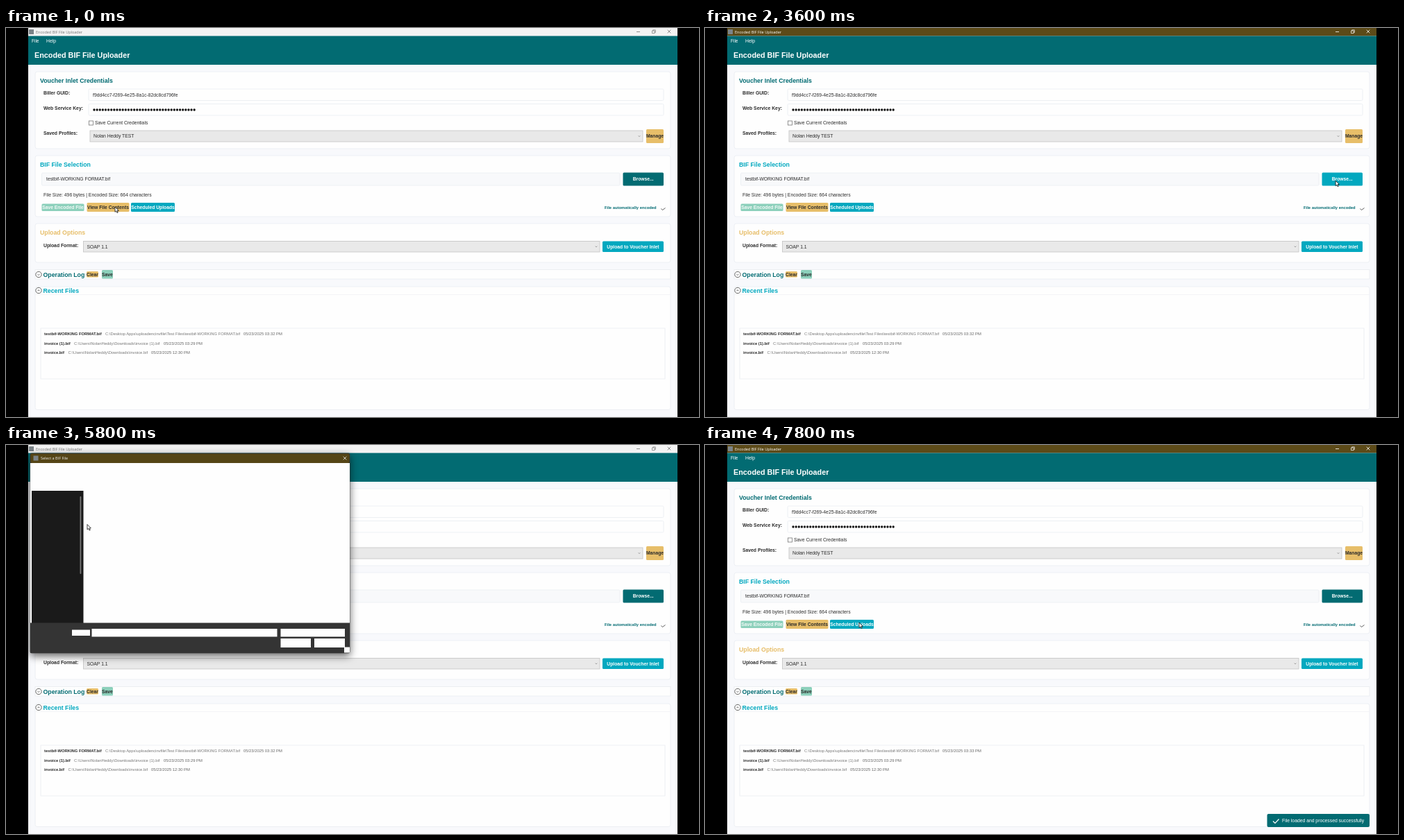
Write an HTML page that moves like this. It is 998x561 px and loops after 8 s.

```html
<!DOCTYPE html>
<html lang="en">
<head>
<meta charset="utf-8">
<title>Encoded BIF File Uploader</title>
<style>
html, body { margin: 0; width: 100%; height: 100%; overflow: hidden; background: #000; }
svg { display: block; width: 100vw; height: 100vh; font-family: "Liberation Sans", Arial, sans-serif; }
.ui { font-family: "Open Sans", "Noto Sans", sans-serif; }
#dialog, #viewer { filter: drop-shadow(0 4px 6px #0009); }
</style>
</head>
<body>
<svg id="stage" viewBox="0 0 998 561"></svg>
<script>
const TEAL = '#026b72', CYAN = '#02a8bf', GOLD = '#e7be69', MINT = '#8cd0bb', BAR = '#5c4a18',
      INK = '#2b2b2b', EDGE = '#e9ecf1', GREY = '#777', PALE = '#ddd';

const box = (x, y, x2, y2, fill, stroke = 'none', r = 0, extra = '') =>
  `<rect x="${x}" y="${y}" width="${x2 - x}" height="${y2 - y}" rx="${r}" fill="${fill}" stroke="${stroke}" stroke-width=".8" ${extra}/>`;
// Text is centred vertically on y.
const text = (x, y, str, size = 6.8, fill = INK, extra = '') =>
  `<text x="${x}" y="${(y + size * .35).toFixed(2)}" font-size="${size}" fill="${fill}" ${extra}>${str}</text>`;
const bold = (x, y, str, size, fill, extra = '') => text(x, y, str, size, fill, 'font-weight="700" ' + extra);
const line = (d, stroke, w = .8) => `<path d="${d}" fill="none" stroke="${stroke}" stroke-width="${w}"/>`;
const dot = (x, y, r, fill, stroke = 'none') =>
  `<circle cx="${x}" cy="${y}" r="${r}" fill="${fill}" stroke="${stroke}" stroke-width=".8"/>`;
const group = (id, body, extra = '') => `<g id="${id}" ${extra}>${body}</g>`;
const cross = (x, y, c) => line(`M${x - 2.3} ${y - 2.3}l4.6 4.6m0-4.6l-4.6 4.6`, c);
const down = (x, y, c, s = 1.5) => line(`M${x - s} ${y - s / 2}l${s} ${s}l${s} ${-s}`, c, .7);
const right = (x, y, c) => line(`M${x - .9} ${y - 1.8}l1.8 1.8l-1.8 1.8`, c, .7);
const button = (x, y, x2, y2, fill, label, ink, id = '') =>
  box(x, y, x2, y2, fill, 'none', 1.5, id && `id="${id}"`) +
  bold((x + x2) / 2, (y + y2) / 2, label, 6.75, ink, 'text-anchor="middle"');
const card = (y, y2) => box(42, y, 957, y2, '#fefefe', EDGE, 3);
const field = (x, y, x2, y2, fill = '#fefefe') => box(x, y, x2, y2, fill, EDGE, 1.5);
const combo = (x, y, x2, y2, label) =>
  box(x, y, x2, y2, '#e9e9e9', '#c3c3c3') + text(x + 5, (y + y2) / 2, label) + down(x2 - 5, (y + y2) / 2, '#666', 1.2);

const titleBar = (id, fill, ink) => group(id,
  box(32, 0, 967, 11.5, fill) + box(33, 2, 40, 9, '#7b8388') +
  text(43, 5.6, 'Encoded BIF File Uploader', 5.5, ink, 'class="ui"') +
  line('M908 5.5h5', ink) + line('M930.5 4h3.6v3.6h-3.6zm1.2 0v-1.2h3.6v3.6h-1.2', ink, .7) + cross(955, 5, ink));

const recent = [
  [441, 'testbif-WORKING FORMAT.bif', 143, 'C:\\Desktop Apps\\uploadencinvfile\\Test Files\\testbif-WORKING FORMAT.bif', 342, '05/23/2025 03:32 PM'],
  [454.5, 'invoice (1).bif', 98, 'C:\\Users\\NolanHeddy\\Downloads\\invoice (1).bif', 227, '05/23/2025 03:29 PM'],
  [468, 'invoice.bif', 89.5, 'C:\\Users\\NolanHeddy\\Downloads\\invoice.bif', 209, '05/23/2025 12:30 PM']
];

const page = () => box(32, 0, 967, 561, '#f8f9fc') + titleBar('idle', '#f3f3f3', '#777') + titleBar('active', BAR, '#fff') +
  box(32, 11.5, 967, 53, TEAL) + text(37, 19, 'File', 6.5, '#fff') + text(58, 19, 'Help', 6.8, '#fff') +
  bold(41, 39.5, 'Encoded BIF File Uploader', 10.8, '#fff') +
  // credentials
  card(63, 174) + bold(49, 75.5, 'Voucher Inlet Credentials', 8.75, TEAL) +
  bold(54, 94, 'Biller GUID:') + field(119, 88, 947, 104.5) + text(125, 96.5, 'f9dd4cc7-f269-4e25-8a1c-82dc8cd796fe') +
  bold(54, 115.5, 'Web Service Key:') + field(119, 109.5, 947, 126) +
  Array.from({length: 36}, (_, i) => dot(127 + i * 4.12, 118, 1.65, '#111')).join('') +
  box(119.5, 134, 125.5, 140, '#fff', '#777') + text(128, 137, 'Save Current Credentials') +
  bold(54, 152, 'Saved Profiles:') + combo(121, 148, 917, 164, 'Nolan Heddy TEST') +
  button(922, 146, 947, 166, GOLD, 'Manage', INK) +
  // file selection
  card(184, 272) + bold(49, 196.5, 'BIF File Selection', 8.75, CYAN) +
  field(51.5, 209, 884, 227, '#f8f9fb') + text(58, 218, 'testbif-WORKING FORMAT.bif') +
  button(888.5, 208.5, 947, 227.5, TEAL, 'Browse...', '#fff', 'browse') +
  text(54, 241, 'File Size: 496 bytes | Encoded Size: 664 characters') +
  button(51.5, 253.5, 112.5, 264, MINT, 'Save Encoded File', '#f4faf8') +
  button(116.5, 252, 177.5, 265, GOLD, 'View File Contents', INK) +
  button(180, 252, 243, 265, CYAN, 'Scheduled Uploads', '#fff') +
  bold(862, 258.5, 'File automatically encoded', 5.85, TEAL) + line('M943.5 260.5l2 2l4-3', '#333') +
  // upload options
  card(282, 338) + bold(49, 295, 'Upload Options', 8.75, GOLD) + bold(54, 314, 'Upload Format:') +
  combo(111.5, 307.5, 855, 323, 'SOAP 1.1') + button(859, 307.5, 947, 323, CYAN, 'Upload to Voucher Inlet', '#fff') +
  // log and recent files
  box(42, 348.5, 957, 362, '#fefefe', EDGE) + dot(47, 355.5, 4.2, '#fff', '#444') + down(47, 355.8, '#333') +
  bold(53.5, 355.5, 'Operation Log', 8.75, TEAL) +
  button(116, 351, 133, 359.5, GOLD, 'Clear', INK) + button(138, 349, 154, 361.5, MINT, 'Save', INK) +
  card(373, 550.5) + line('M42 384.5h915', '#f0f2f5') + dot(47, 378.5, 4.2, '#fff', '#444') + line('M45.5 379.2l1.5-1.5l1.5 1.5', '#333') +
  bold(53.5, 378.5, 'Recent Files', 8.75, CYAN) + box(50, 433, 949, 506, '#fefefe', EDGE) +
  recent.map(([y, name, x, path, dx, date], i) => bold(55, y, name, 5.85) + text(x, y, path, 5.85, GREY) +
    text(dx, y, date, 5.85, '#666', `id="date${i}"`)).join('') +
  group('toast', box(809.5, 532, 957, 551, TEAL, 'none', 2) + line('M818 542.5l3 3l5.5-6', '#fff', 1.2) +
    text(831, 541.5, 'File loaded and processed successfully', 6.8, '#fff'));

const viewer = () => group('viewer', box(103, 118, 895, 440, '#fefefe', '#bbb') + box(103, 118, 895, 130, BAR) + cross(887, 124, '#fff'));

const files = [
  ['invoice (2).bif', '5/23/2025 2:25 PM'], ['invoice.bif', '5/23/2025 11:10 AM'],
  ['invoice_encoded (4).bif', '5/23/2025 9:50 AM'], ['invoice_encoded (3).bif', '5/16/2025 1:04 PM'],
  ['testbif-WORKING FORMAT.bif', '5/23/2025 3:32 PM']
];
const places = ['Documents', 'Pictures', 'Music', 'Videos', 'uploadencinvfile', 'Addinvoicefile', 'images', 'Test Files'];
const placeInk = ['#7d96a8', '#3b9ade', '#e4606d', '#9a5be0'];
const crumbs = [[124, 'This PC'], [154, 'Local Disk (C:)'], [200, 'Desktop Apps'], [248, 'uploadencinvfile'], [300, 'Test Files']];
const rowY = i => 88.5 + i * 14;
const t = (x, y, str, fill = PALE, extra = '') => text(x, y, str, 5.6, fill, extra);
const folder = (x, y) => box(x, y - 2.5, x + 7, y + 2.7, '#f3c64e', 'none', .6) + box(x, y - 3.2, x + 3, y - 1, '#d99d2b');
const pin = (x, y) => line(`M${x - 2} ${y + 2}l2-2m-1-1.5l2.6 2.6m-1.5-3.6l2 2`, '#bbb', .8);

const shell = () => group('shell', box(35, 26, 495, 257, '#fefefe') + box(37, 66, 111.5, 257, '#1a1a1a') +
  box(106.5, 74, 108.3, 186, '#777', 'none', 1) + box(35, 256.5, 495, 300, '#343434') +
  [[95, 266.5, 121, 275], [123.5, 265, 390.5, 276.5], [395.5, 265, 488, 276.5], [395.5, 279, 439, 292],
   [444, 279, 488, 292], [487, 291.5, 495, 299.5]].map(r => box(...r, '#fefefe')).join(''));

const content = () => group('content',
  line('M48.5 38h-6m2.4-2.4l-2.4 2.4l2.4 2.4', PALE) + line('M59.5 38h6m-2.4-2.4l2.4 2.4l-2.4 2.4', GREY) +
  down(77.5, 38, '#999') + line('M92.5 41v-6m-2.4 2.4l2.4-2.4l2.4 2.4', PALE) +
  box(103, 30, 372, 46, '#1f1f1f', '#2c2c2c') + box(392, 30, 489, 46, '#1f1f1f', '#2c2c2c') + folder(106.5, 38) +
  crumbs.map(([x, s]) => right(x - 5.5, 38, '#ccc') + t(x, 38, s)).join('') + down(364, 38, PALE, 2) +
  line('M383 36.2a2.8 2.8 0 1 0 .5 2.4m0-4v2h-2', PALE) + t(397, 38, 'Search Test Files', '#777') +
  line('M480 40.5l2-2m0-.2a1.8 1.8 0 1 0 2.6-2.4a1.8 1.8 0 0 0-2.6 2.4', '#bbb') +
  line('M35 51h460', '#2c2c2c') + t(44, 58, 'Organize') + down(71, 58, '#999', 1) + t(87, 58, 'New folder') +
  box(438, 54.5, 446, 61, '#aaa', '#ccc') + down(452, 58, '#bbb', 1) + box(463, 54.5, 471, 61, '#eee') + box(467, 55, 471, 60.5, '#3a9bdc') +
  dot(485, 57.5, 3.8, '#1683d8') + t(485, 57.5, '?', '#fff', 'text-anchor="middle"') +
  places.map((s, i) => {
    const y = 73.5 + i * 15.65;
    return (i < 4 ? box(52, y - 3, 58.5, y + 3, placeInk[i], 'none', 1) + pin(99, y) : folder(52, y)) + t(61, y, s);
  }).join('') +
  line('M41 198h58', '#3a3a3a') + box(37, 222.5, 103, 237, '#363636') +
  down(43.5, 214, PALE, 2) + box(52, 211, 59, 216, '#36a6df', 'none', .5) + t(61, 214, 'This PC') +
  right(47.5, 229.5, PALE) + box(56, 227.5, 63, 231.5, '#9fb8c8') + t(64.5, 229.5, 'Local Disk (C:)') +
  right(43.5, 245, PALE) + box(52, 242, 59, 247.5, '#4aa8cf') + t(61, 245, 'Network') +
  box(106.3, 104, 108.3, 238, '#8a8a8a', 'none', 1) + line('M112 66v190', '#2c2c2c') +
  line('M262 66v14M341 66v14M407 66v14M451 66v14', '#444', .7) + line('M192 68l1.5-1.2l1.5 1.2', '#888', .6) +
  t(127.5, 73, 'Name') + t(265, 73, 'Date modified') + t(344.5, 73, 'Type') + t(410, 73, 'Size') +
  box(120, 0, 449, 13, '#4d4d4d', 'none', 0, 'id="hover"') +
  files.map(([name, date], i) => {
    const y = rowY(i);
    return box(123, y - 3.6, 128.5, y + 3.6, '#e8e8e8') + line(`M124.2 ${y - 1}h3m-3 1.7h3`, '#888', .5) +
      t(131, y, name) + t(265, y, date, '#bbb') + t(344.5, y, 'BIF File', '#bbb') + t(448, y, '1 KB', '#bbb', 'text-anchor="end"');
  }).join('') +
  box(35, 256.5, 495, 300, '#2b2b2b') + t(95, 271, 'File name:') + box(123.5, 265, 390, 276.5, '#383838', '#999') + down(385.5, 271, '#bbb') +
  t(126, 271, 'testbif-WORKING FORMAT.bif', '#eee', 'id="chosen"') +
  box(395.5, 265, 488, 276.5, '#333', '#777') + t(397.5, 271, 'BIF Files (*.bif)') + down(483, 271, '#bbb') +
  box(396, 279.5, 438.5, 291.5, '#333', '#ddd', 1) + t(417.5, 285.5, 'Open', '#eee', 'text-anchor="middle"') +
  box(445, 279.5, 487.5, 291.5, '#333', '#777', 1) + t(466, 285.5, 'Cancel', '#eee', 'text-anchor="middle"'));

const dialog = () => group('dialog', box(35, 12, 495, 300, '#191919', '#444', 2) + box(35.4, 12.4, 494.6, 26, '#554516', 'none', 2) +
  box(39.5, 15.5, 46.5, 22.5, '#7b8388') + text(50, 19, 'Select a BIF File', 5.5, '#eee') + cross(488, 19, '#eee') +
  shell() + content(), 'class="ui"');

const stage = document.getElementById('stage');
stage.innerHTML = page() + viewer() + dialog() +
  group('cursor', '<path d="M0 0v7.4l1.7-1.5l1.3 2.7l1.3-.6l-1.3-2.6h2.3z" fill="#fff" stroke="#111" stroke-width=".8"/>');
const el = id => document.getElementById(id);
const show = (id, opacity) => el(id).setAttribute('opacity', +opacity);

// Pointer path: time, x, y
const pointer = [[0, 157, 258], [1000, 157, 258], [1600, 885, 122], [1800, 885, 122], [2200, 889, 213], [2800, 889, 213],
  [3400, 905, 222], [4000, 917, 215], [4800, 931, 216], [5000, 931, 216], [5600, 117, 114.5], [5800, 117, 114.5],
  [6400, 143, 124], [6800, 149, 141.5], [7000, 149, 141.5], [7800, 222, 256], [8000, 222, 256]];
function pointerAt(ms) {
  const i = pointer.findIndex(p => p[0] > ms), [t0, x0, y0] = pointer[i - 1], [t1, x1, y1] = pointer[i];
  const k = (ms - t0) / (t1 - t0), e = k * k * (3 - 2 * k);
  return [x0 + (x1 - x0) * e, y0 + (y1 - y0) * e];
}

function draw(ms) {
  const within = (a, b) => ms >= a && ms < b;
  show('active', within(1800, 5200) || ms >= 7400);
  el('browse').setAttribute('fill', within(2400, 5200) ? CYAN : TEAL);
  show('viewer', within(200, 1800) ? (ms < 400 ? .5 : 1) : 0);

  const fading = ms < 5600 || ms >= 7000, scale = fading ? .965 : 1;
  show('dialog', within(5400, 7200) ? (fading ? .47 : 1) : 0);
  el('dialog').setAttribute('transform', `translate(264 156) scale(${scale}) translate(-264 -156)`);
  show('shell', ms < 6000);
  show('content', ms >= 6000);
  el('hover').setAttribute('y', rowY(ms < 6600 ? 2 : 4) - 6.5);
  show('chosen', ms >= 6800);

  el('date0').textContent = `05/23/2025 03:${ms < 7400 ? 32 : 33} PM`;
  show('toast', ms < 7600 ? 0 : ms < 7800 ? .6 : 1);
  el('cursor').setAttribute('transform', `translate(${pointerAt(ms)})`);
}

(function frame() {
  draw(Math.floor(performance.now() % 8000 / 200) * 200);
  requestAnimationFrame(frame);
})();
</script>
</body>
</html>
```
